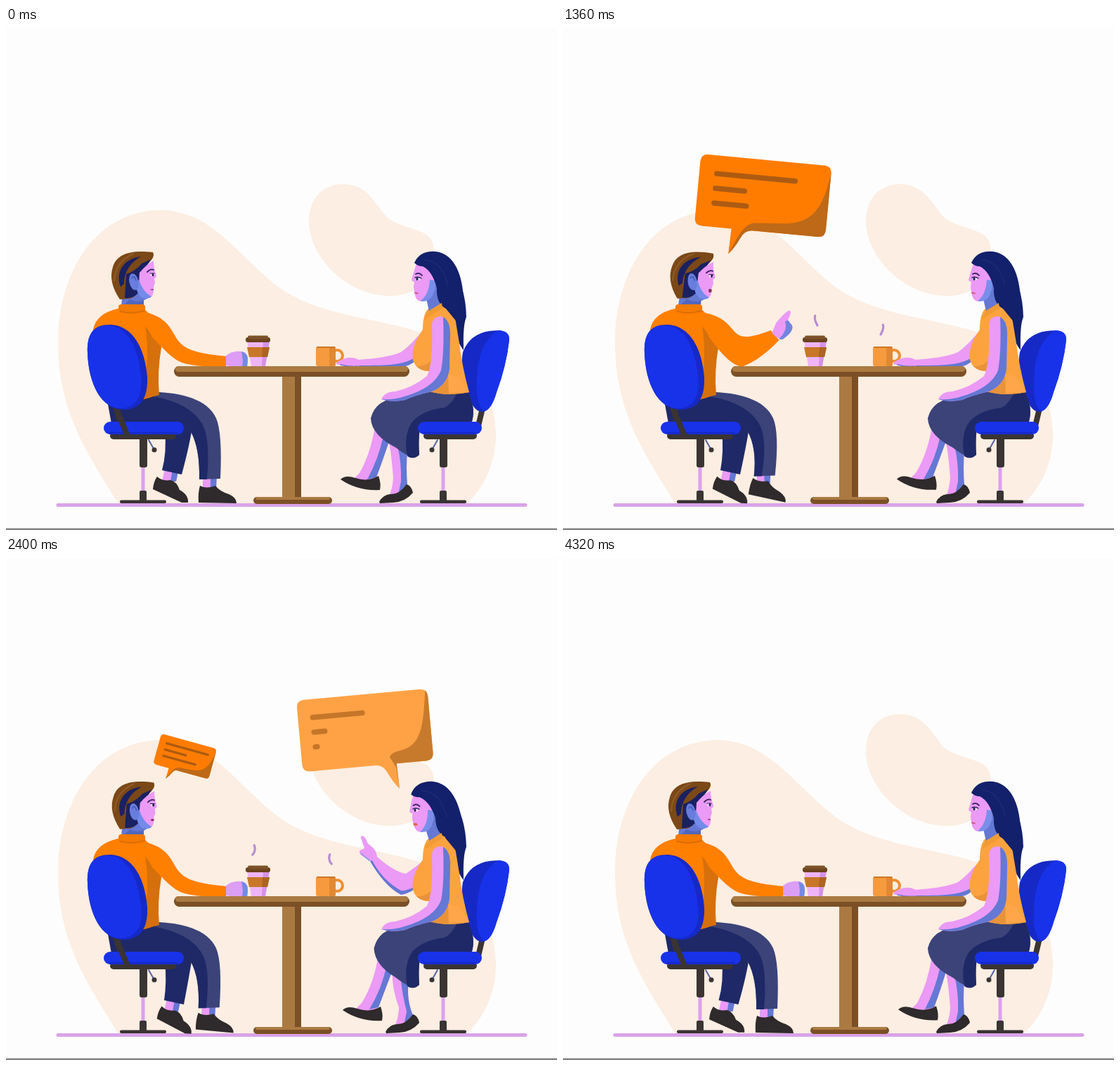
Animation, 784 px wide and 714 px high, one loop 4.4 s. Source, as an HTML page with a canvas:

```html
<!DOCTYPE html>
<html lang="en">
<head>
<meta charset="utf-8">
<title>Conversation at a table</title>
<style>
html, body { margin: 0; width: 100%; height: 100%; overflow: hidden; background: #fdfdfd; }
canvas { display: block; }
</style>
</head>
<body>
<canvas id="stage" width="784" height="714"></canvas>
<script>
const ctx = document.getElementById('stage').getContext('2d');
const LOOP = 4400, STEP = 80;
const C = {
  blob: '#fceee2', pink: '#eb9af6', skin: '#6478d4', navy: '#1f2968', slate: '#3b4378',
  blue: '#1832ea', deep: '#1629c6', dark: '#3a3433', shoe: '#2f2a2b', orange: '#ff7f00',
  rust: '#d5700c', wood: '#ab7a42', bark: '#7b5026', hair: '#13206b', blouse: '#fca33f', floor: '#d9a3e8'
};

const clamp = x => Math.max(0, Math.min(1, x));
const ramp = (t, from, span) => clamp((t - from) / span);

// eased value between [time, value] pairs
function key(t, list) {
  if (t <= list[0][0]) return list[0][1];
  for (let i = 1; i < list.length; i++) {
    const [a, va] = list[i - 1], [b, vb] = list[i];
    if (t <= b) {
      const x = (t - a) / (b - a);
      return va + (vb - va) * x * x * (3 - 2 * x);
    }
  }
  return list[list.length - 1][1];
}

// blends two path strings that share one structure
function morph(a, b, p) {
  const nums = b.match(/-?\d+/g);
  let i = 0;
  return a.replace(/-?\d+/g, n => (+n + (nums[i++] - n) * p).toFixed(2));
}

function fill(d, color) {
  ctx.fillStyle = color;
  ctx.fill(new Path2D(d));
}

function line(d, color, width, cap = 'round') {
  ctx.strokeStyle = color;
  ctx.lineWidth = width;
  ctx.lineCap = cap;
  ctx.stroke(new Path2D(d));
}

function box(x, y, w, h, r, color) {
  ctx.fillStyle = color;
  ctx.beginPath();
  ctx.roundRect(x, y, w, h, r);
  ctx.fill();
}

function oval(x, y, rx, ry, turn, color) {
  ctx.fillStyle = color;
  ctx.beginPath();
  ctx.ellipse(x, y, rx, ry, turn, 0, 7);
  ctx.fill();
}

// draws with a shift and a turn in degrees about a pivot
function pose(dx, dy, deg, px, py, draw) {
  ctx.save();
  ctx.translate(px + dx, py + dy);
  ctx.rotate(deg * Math.PI / 180);
  ctx.translate(-px, -py);
  draw();
  ctx.restore();
}

function backdrop() {
  ctx.fillStyle = '#fdfdfd';
  ctx.fillRect(0, 0, 784, 714);
  fill('M222 259 C130 258 74 345 74 448 C74 550 120 610 160 677 L655 677 C685 650 698 610 697 575 C694 490 640 445 570 427 C510 411 440 405 390 370 C330 325 295 261 222 259Z', C.blob);
  fill('M480 222 C450 222 431 243 431 275 C431 325 485 382 548 381 C590 381 612 350 608 308 C602 282 560 288 540 267 C523 247 514 223 480 222Z', C.blob);
  line('M74 678.5 H739', C.floor, 5);
  ctx.fillStyle = '#858585';
  ctx.fillRect(0, 711.5, 784, 2.5);
}

function stand(x, side) {
  line(`M${x + 8 * side} 586 L${x + 16 * side} 600`, '#5564a8', 2);
  oval(x + 16 * side, 600, 3.5, 3.5, 0, C.dark);
  box(x - 5, 582, 11, 43, 3, C.dark);
  box(x - 2.5, 625, 5, 36, 0, '#dda0ee');
  box(x - 5, 658, 10, 16, 2, C.dark);
  box(x - 33, 671.5, 66, 4.5, 2, C.dark);
}

function seat(x, w, barX, barW) {
  box(barX, 575, barW, 10, 5, C.dark);
  box(x, 560, w, 18, 9, C.blue);
  line(`M${x + 9} 576 H${x + w - 10}`, C.deep, 2.5);
}

function table() {
  box(393, 494, 27, 176, 0, C.wood);
  box(411, 494, 9, 176, 0, C.bark);
  box(352, 667, 112, 10, 5, C.bark);
  box(355, 667, 106, 4, 2, C.wood);
  box(239, 481, 335, 15, 7.5, C.bark);
  box(241, 481, 331, 8, 4, C.wood);
}

function cups() {
  fill('M343 445 H375 L369 481 H349Z', '#efb4f6');
  fill('M366 445 H375 L369 481 H364Z', '#d492e6');
  fill('M343 454 H375 L372 468 H346Z', '#c87628');
  fill('M365 454 H375 L372 468 H364Z', '#ad6423');
  box(341, 440, 35, 7, 3, '#6b431f');
  box(344, 437.5, 29, 5, 2, '#7d5228');
  ctx.strokeStyle = '#f08f32';
  ctx.lineWidth = 4;
  ctx.beginPath();
  ctx.ellipse(471, 466, 8, 8, 0, 0, 7);
  ctx.stroke();
  box(441, 453, 28, 28, 3, '#f59a3e');
  box(460, 453, 9, 28, 2, '#e18831');
  line('M443 454 H467', '#cf7727', 2);
}

const WISP = {
  a: 'M366 439 C365 427 363 425 361 421 C356 412 358 408 364 402',
  b: 'M354 440 C346 429 349 424 353 419 C357 409 350 403 343 400'
};
const PUFFS = [[-1370, 'a'], [680, 'a'], [1640, 'b'], [2700, 'a']];

function steam(t) {
  for (const [start, kind] of PUFFS) {
    const x = (t - start) / 1420;
    if (x <= 0 || x >= 1) continue;
    const head = 43 * (1 - (1 - x) ** 2), tail = 43 * ramp(x, .15, .85);
    ctx.save();
    ctx.setLineDash([Math.max(.1, head - tail), 200]);
    ctx.lineDashOffset = -tail;
    line(WISP[kind], '#b88bd3', 3.2);
    ctx.translate(814, 13);
    ctx.scale(-1, 1);
    line(WISP[kind], '#b88bd3', 3.2);
    ctx.restore();
  }
}

const SLEEVE = [
  'M190 403 C222 407 232 422 240 437 C250 455 262 462 314 467 L313 481 C285 483 258 480 246 474 C232 466 224 456 208 440Z',
  'M190 403 C222 407 232 418 240 428 C250 441 258 446 297 433 L308 447 C285 468 270 476 254 481 C240 479 226 464 208 440Z'
];

function manHead(t) {
  const talk = t > 720 && t < 2480 ? Math.abs(Math.sin(t / 130)) : 0;
  fill('M166 370 L190 352 L204 383 L195 388 L196 397 H164Z', C.skin);
  fill('M176 386 Q186 391 196 387 L196 397 H165Z', '#5166bd');
  fill('M152 340 C157 322 176 315 209 319 Q212 324 206 331 L192 346 L192 368 Q184 386 172 385 L162 386 Q145 361 152 340Z', '#7b4817');
  fill('M163 368 C155 346 168 328 192 325 C178 333 168 346 168 364Z', '#1a2161');
  fill('M171 350 Q184 346 193 335 L206 329 L196 346 L192 372 Q183 386 169 384Z', '#1a2161');
  line('M154 360 Q155 333 181 321', '#8f5a28', 2);
  fill('M190 348 Q200 336 210 331 Q210 342 214 352 Q214 355 211 356 L212 362 L210 368 Q211 383 203 384 Q192 379 189 364Z', C.pink);
  fill('M189 358 Q195 376 207 382 Q203 386 194 384 Q185 378 185 364Z', '#748bea');
  oval(182, 361, 6.5, 12, -.2, '#687ddd');
  line('M179 356 Q182 350 185 359', '#435ab6', 1.5);
  line('M201 347 Q206 342 210 344', '#36215e', 1.8);
  oval(208, 351, 2.8, 2.2, 0, '#f8e4fb');
  oval(209, 351, 1.5, 2.2, 0, '#252453');
  line('M205 349 L211 349', '#36215e', 1.2);
  oval(208, 372, 2.4, .8 + talk * 2, 0, '#843057');
}

function manLegs(t) {
  const lift = key(t, [[600, 0], [960, .4], [1840, 1], [2080, 1], [2400, .25], [2600, 0]]);
  const swing = key(t, [[0, 0], [480, 6], [960, 4], [1400, 4], [1840, -4], [2400, 6], [3040, -1], [3600, 6], [4320, -1]]);
  const sx = swing / 2, cx = -5 * lift, cy = -7 * lift;
  fill(`M${226 + sx} 627 h19 l-3 18 h-20Z`, C.pink);
  fill(`M${237 + sx} 627 h9 l-4 18 h-8Z`, C.skin);
  pose(swing, 0, swing * .5, 225, 650, () =>
    fill('M215 638 Q222 645 234 643 Q243 645 247 657 Q260 664 259 675 L250 675 L209 656 Q210 645 215 638Z', C.shoe));
  fill(`M226 556 L259 556 L264 574 Q260 598 ${250 + sx} 635 L${222 + sx} 629 Q229 604 226 570Z`, C.navy);
  pose(cx - 2 * lift, cy, 0, 0, 0, () => {
    fill('M281 637 H300 L299 656 H280Z', C.skin);
    fill('M281 637 H291 L291 656 H280Z', C.pink);
  });
  pose(-17 * lift, -2 * lift, 17 * lift, 328, 675, () =>
    fill('M276 651 Q285 656 298 651 Q304 659 317 663 Q328 668 328 676 L274 675 Q273 661 276 651Z', C.shoe));
  fill('M145 535 L215 516 L258 555 L252 570 L151 568Z', C.navy);
  fill(`M206 518 C245 517 287 527 299 555 Q308 576 ${305 + cx} ${641 + cy} L${275 + cx} ${642 + cy} Q276 598 263 574 Q260 560 235 560 L195 557Z`, C.slate);
  fill(`M197 523 C240 526 275 545 283 572 Q290 595 ${286 + cx} ${642 + cy} L${275 + cx} ${642 + cy} Q276 598 263 574 Q260 560 235 560 L185 560Z`, C.navy);
}

function man(t) {
  const p = key(t, [[660, 0], [940, 1], [1840, 1.2], [2080, 1.22], [2370, 0]]);
  stand(195, 1);
  manLegs(t);
  fill('M160 399 Q128 406 124 429 L144 532 Q186 535 217 521 Q214 490 221 452 L212 414 L198 401Z', C.orange);
  fill('M198 424 Q213 444 221 454 Q215 490 218 522 L193 528 Q206 470 198 424Z', C.rust);
  fill(morph(...SLEEVE, p), C.orange);
  if (p < .5) pose(-11 * p, -34 * p, -45 * p, 313, 474, () => {
    fill('M313 466 Q325 457 339 461 Q345 464 344 474 L343 482 Q327 483 313 480Z', '#dc9df4');
    fill('M335 460 Q345 463 344 474 L343 482 L336 482 Q338 473 335 460Z', '#728be5');
  });
  else pose(17 * (1 - p), 34 * (1 - p), (1 - p) * 16, 302, 440, () => {
    fill('M299 437 Q302 430 305 423 Q314 411 324 405 Q329 406 322 419 L328 427 Q330 436 314 446 Q307 446 299 437Z', C.pink);
    fill('M322 419 L328 427 Q330 436 314 446 L308 446 Q322 434 318 421Z', '#7186df');
  });
  const tilt = key(t, [[640, 0], [960, 1.8], [1840, 6], [2080, 5], [2400, 1], [2560, 0]]);
  pose(0, 0, tilt, 183, 394, () => manHead(t));
  box(160, 393, 38, 12, 4, '#f57a00');
  line('M163 403 Q180 408 197 402', '#dc6e06', 2);
  line('M157 540 Q162 558 170 579', C.dark, 9);
  fill('M150 422 C126 421 115 433 116 462 C117 505 135 543 168 543 C193 542 202 525 201 497 C198 455 180 424 150 422Z', C.deep);
  fill('M147 423 C125 422 115 434 116 462 C118 505 136 540 162 541 C187 541 195 522 192 494 C188 455 173 425 147 423Z', C.blue);
  seat(139, 114, 148, 94);
  line('M163 556 L172 578', C.dark, 8);
}

const FAR_ARM = [
  'M596 428 C584 440 575 452 562 461 C545 468 525 470 500 472 L500 482 C530 483 555 484 572 480 C582 476 588 468 592 460Z',
  'M596 428 C590 434 582 440 569 449 C560 448 545 440 528 425 L518 431 C530 452 545 470 562 479 C576 477 586 468 592 460Z'
];
const FAR_SHADE = [
  'M500 482 C530 483 555 484 572 480 C582 476 588 468 592 460 C580 472 570 475 560 477 C545 480 525 480 500 480Z',
  'M518 431 C530 452 545 470 562 479 C576 477 586 468 592 460 C580 470 568 474 562 473 C545 464 530 448 521 430Z'
];

function womanHead(t) {
  const talk = t > 2000 && t < 3640 ? Math.abs(Math.sin(t / 130)) : 0;
  fill('M599 345 L620 350 L620 392 L602 403 L598 385Z', C.skin);
  fill('M584 335 Q580 347 577 358 Q578 361 581 361 L580 368 L581 376 Q583 389 592 389 Q603 387 610 372 L608 340 L592 333Z', C.pink);
  fill('M603 358 Q602 379 590 388 Q600 391 607 381 L613 360Z', '#798eea');
  fill('M581 334 Q589 316 612 318 C640 322 649 354 651 382 L653 412 L624 398 Q612 390 613 370 Q607 346 593 339 Q586 339 581 334Z', C.hair);
  line('M596 330 Q617 331 626 357 T641 398', '#1d2a76', 1.5);
  line('M583 350 Q588 347 592 352', '#37215f', 1.8);
  oval(586, 357, 3.6, 2.2, 0, '#f9e5fb');
  oval(585, 357, 1.6, 2.2, 0, '#292556');
  line('M582 355 Q586 353 591 356', '#37215f', 1.4);
  oval(584, 377, 3, 1.2 + talk * 1.6, .2, talk ? '#e36438' : '#d36087');
}

function womanLegs(t, k) {
  const far = key(t, [[0, 0], [500, -3], [960, -3], [1400, -1], [1840, -3], [2400, 3], [3040, 4], [3600, -3], [4320, 1]]);
  const n = 9 * k, m = 5 * k;
  fill(`M${525 + m} 566 Q${519 + m} 605 ${503 + far} 633 L${493 + far} 643 Q${511 + far} 648 ${527 + far} 639 Q${536 + far} 615 ${546 + m} 585Z`, C.pink);
  fill(`M${537 + m} 580 Q${530 + m} 613 ${514 + far} 642 L${527 + far} 639 Q${536 + far} 615 ${546 + m} 585Z`, C.skin);
  pose(far, far / 3, 0, 0, 0, () =>
    fill('M476 642 Q483 635 497 640 Q515 646 530 637 Q534 648 532 657 Q501 659 476 642Z', C.shoe));
  fill(`M${545 + m} 588 Q549 612 ${551 + n} 640 Q${550 + n} 655 ${545 + n} 666 L${561 + n} 663 L${571 + n} 650 Q569 627 ${571 + m / 2} 600Z`, C.pink);
  fill(`M${557 + m} 594 Q563 619 ${562 + n} 645 L${558 + n} 664 L${571 + n} 651 Q569 627 ${571 + m / 2} 600Z`, C.skin);
  pose(n + k, 0, 0, 0, 0, () =>
    fill('M531 674 Q536 664 547 663 Q559 664 570 649 Q577 651 579 661 Q568 674 551 675 L532 676Z', C.shoe));
  fill(`M602 515 L656 515 Q669 538 663 560 L591 562 Q586 577 588 607 Q579 616 555 597 Q${520 + m} 579 ${519 + m} 555 Q${526 + m} 527 563 525Z`, C.slate);
  fill('M656 515 Q669 538 663 560 L591 562 Q586 577 588 607 Q580 615 571 609 Q565 577 579 559 Q595 543 624 540 Q638 532 642 516Z', C.navy);
}

function woman(t) {
  const p = key(t, [[1850, 0], [2130, .95], [2400, 1], [3040, 1.2], [3280, 1.22], [3620, 0]]);
  const k = key(t, [[1850, 0], [2250, .9], [3040, 1], [3280, 1], [3580, 0]]);
  const tilt = key(t, [[1840, 0], [2400, -4.5], [3040, -7], [3280, -7], [3640, 0]]);
  stand(622, -1);
  line('M678 541 L672 566', C.dark, 8);
  fill('M688 431 Q717 427 716 444 Q712 480 698 518 Q690 546 677 546 Q663 545 656 514 Q646 481 650 461 Q660 435 688 431Z', C.deep);
  fill('M700 430 Q717 430 716 444 Q712 480 698 518 Q691 543 680 545 Q668 534 670 502 Q671 448 700 430Z', C.blue);
  womanLegs(t, k);
  seat(586, 91, 594, 76);
  fill(morph(...FAR_ARM, p), C.pink);
  fill(morph(...FAR_SHADE, p), C.skin);
  if (p < .5) pose(22 * p, -50 * p, 45 * p, 500, 477, () => {
    fill('M502 472 Q492 466 479 471 Q469 475 470 478 Q483 482 502 482Z', C.pink);
    line('M476 479 Q488 482 500 481', C.skin, 1.5);
  });
  else pose(22 * (p - 1), 50 * (1 - p), (p - 1) * 16, 522, 427, () => {
    fill('M518 431 L511 426 Q502 422 503 416 L510 413 L505 398 Q506 392 511 398 L515 406 L523 413 Q528 419 528 426Z', C.pink);
    line('M505 420 Q510 425 517 430', '#8299ee', 1.6);
  });
  fill('M620 389 Q645 395 649 418 L651 458 Q637 441 637 410Z', C.hair);
  fill('M618 390 L600 400 Q593 408 593 429 Q576 453 579 472 Q584 488 602 488 Q604 507 599 516 Q628 525 659 518 Q649 482 645 448 L638 406 Q631 394 618 390Z', C.blouse);
  fill('M602 488 Q591 488 584 481 Q602 482 609 466 L631 493 L659 518 Q628 525 599 516 Q604 507 602 488Z', '#e89339');
  fill('M629 491 L644 496 L659 518 L630 520Z', '#ffa54a');
  pose(0, 0, tilt, 606, 396, () => womanHead(t));
  fill('M633 340 Q654 366 655 411 Q650 422 651 458 Q643 448 643 420 L625 398Z', C.hair);
  fill('M620 391 L602 402 Q598 406 596 414 Q611 405 621 399Z', '#f19b34');
  fill('M606 424 Q606 410 619 410 Q632 414 632 440 L631 485 Q628 508 606 517 Q583 522 568 529 Q548 533 534 528 Q539 517 554 517 Q580 511 599 495 Q608 476 606 424Z', C.pink);
  fill('M622 411 Q633 417 632 440 L631 485 Q628 508 606 517 Q583 522 568 529 Q548 533 534 528 Q554 529 567 524 Q609 512 619 487 Q624 460 622 411Z', C.skin);
}

const BUBBLE = 'M-41 -138 H124 Q135 -138 135 -127 V-47 Q135 -36 124 -36 H31 Q20 -36 15 -24 Q8 -9 0 0 L1 -36 H-41 Q-52 -36 -52 -47 V-127 Q-52 -138 -41 -138Z';
const TEXT = [[-112, 139, 380, 540], [-91, 70, 560, 430], [-70, 108, 645, 400]];
const LEFT = {
  start: 545, side: 1, x0: -27, color: '#ff7c00', shade: '#bd6918', ink: '#ad5b12',
  fold: 'M136 -134 C130 -95 125 -56 80 -51 L32 -47 Q18 -44 8 -18 L0 0 H140 V-134Z'
};
const RIGHT = {
  start: 1745, side: -1, x0: -114, color: '#ffa245', shade: '#c87a2c', ink: '#c57629',
  fold: 'M49 -138 C42 -85 36 -58 6 -54 Q-8 -52 -10 -46 L-2 -30 L0 0 H60 V-138Z'
};

function bubble(t, b) {
  const u = t - b.start;
  const size = (1 - (1 - ramp(u, 0, 590)) ** 3) * (1 - ramp(u, 1615, 320) ** 2);
  if (size <= 0) return;
  const x = key(u, [[0, 221], [90, 226], [410, 229], [650, 235], [1290, 236], [1610, 236], [1850, 227], [1930, 222]]);
  const y = key(u, [[0, 310], [90, 314], [410, 318], [650, 321], [1290, 322], [1610, 322], [1850, 314], [1930, 310]]);
  const turn = key(u, [[0, 17], [90, 15], [410, 2.7], [650, 5.2], [1290, 6.5], [1610, 7], [1850, 15.5], [1930, 18]]);
  ctx.save();
  ctx.translate(b.side > 0 ? x : 795 - x, b.side > 0 ? y : y + 7);
  ctx.rotate(b.side * turn * Math.PI / 180);
  ctx.scale(size, size);
  ctx.save();
  ctx.scale(b.side, 1);
  fill(BUBBLE, b.color);
  ctx.clip(new Path2D(BUBBLE));
  ctx.scale(b.side, 1);
  fill(b.fold, b.shade);
  ctx.restore();
  for (const [ty, len, from, span] of TEXT) {
    const w = len * ramp(u, from, span);
    if (w > 0) line(`M${b.x0} ${ty} h${w}`, b.ink, 7.5);
  }
  ctx.restore();
}

function draw(now) {
  const t = Math.floor(now % LOOP / STEP) * STEP;
  backdrop();
  cups();
  steam(t);
  man(t);
  woman(t);
  table();
  bubble(t, LEFT);
  bubble(t, RIGHT);
}

const began = performance.now();
function tick() {
  draw(performance.now() - began);
  requestAnimationFrame(tick);
}
tick();
</script>
</body>
</html>
```
